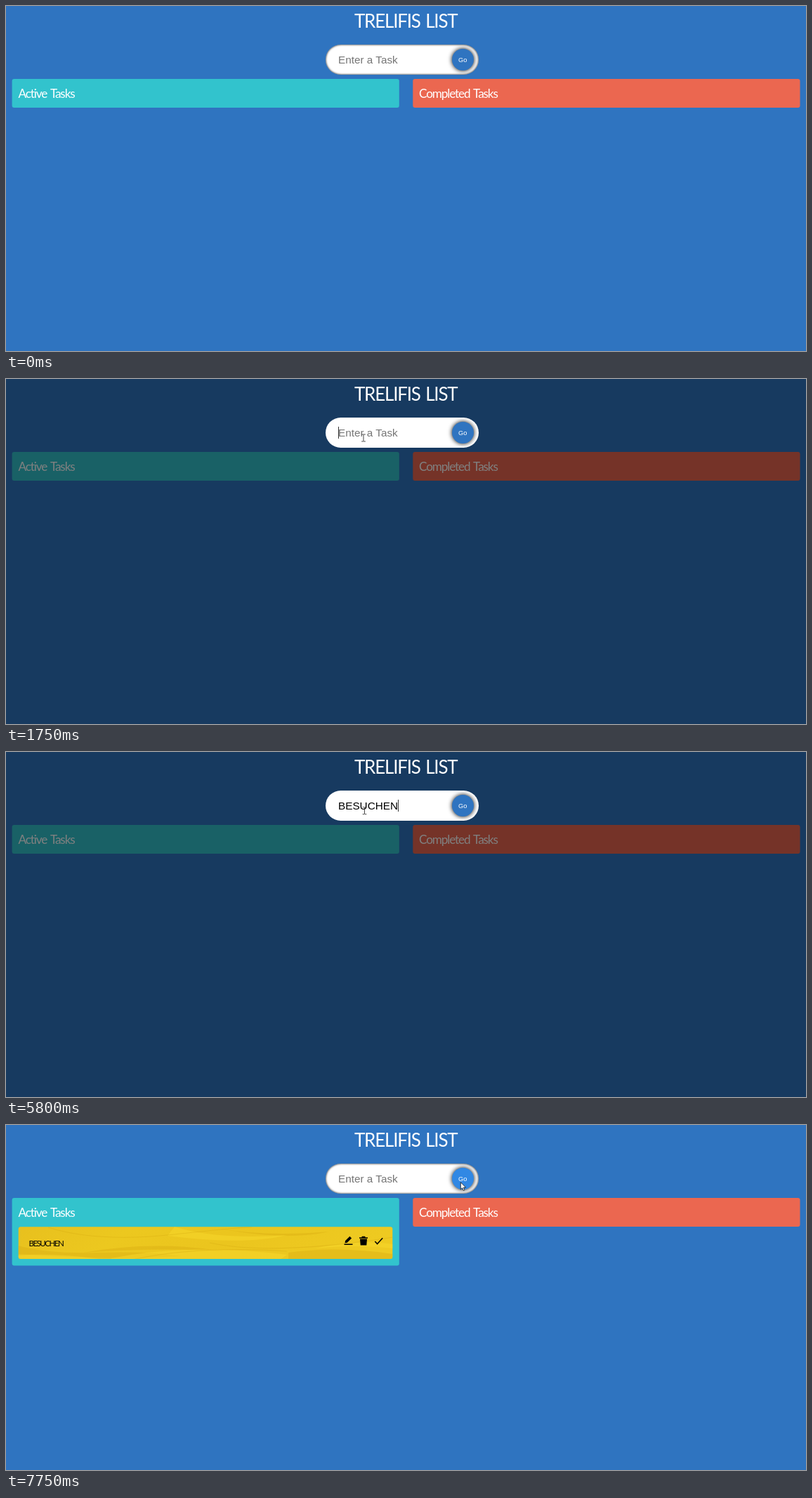
These frames come from a looping animation (1139 px wide and 492 px high, 8000 ms). An HTML page:

```html
<!DOCTYPE html>
<html lang="en">
<head>
<meta charset="utf-8">
<title>Task list</title>
<style>
  html, body { margin: 0; width: 100%; height: 100%; overflow: hidden; background: #2f74c0; }
  body { position: relative; }
  svg, #field, #go { position: absolute; }
  svg { left: 0; top: 0; width: 1139px; height: 492px; }
  text { white-space: pre; }
  .hand { font-family: Lato, "Open Sans", sans-serif; fill: #fff; }
  .head { font-size: 17.2px; letter-spacing: -1.15px; word-spacing: 2px; }
  .title { font-size: 26px; letter-spacing: -1.2px; word-spacing: 2px; text-anchor: middle; }
  .task { font-size: 11.5px; letter-spacing: -1.5px; fill: #000; }
  .plain { font-family: "Liberation Sans", Arial, sans-serif; font-size: 15.3px; }
  #field {
    left: 454.5px; top: 55.3px; width: 218.3px; height: 42.4px;
    border-radius: 22px; background: #fff; box-shadow: inset 0 0 3px #000;
  }
  #field.focus { box-shadow: 0 0 6px 1200px rgba(0, 0, 0, .5); }
  #go {
    left: 634.5px; top: 61px; width: 31px; height: 31px;
    border-radius: 50%; box-shadow: 0 0 6px #000;
  }
</style>
</head>
<body>
<svg viewBox="0 0 1139 492">
  <defs>
    <linearGradient id="cloth" x2="1" y2=".12">
      <stop offset="0" stop-color="#e8c01e"/>
      <stop offset=".3" stop-color="#ecc81f"/>
      <stop offset=".6" stop-color="#ebc51e"/>
      <stop offset="1" stop-color="#eeca21"/>
    </linearGradient>
    <clipPath id="cardShape"><rect x="17.7" y="145.3" width="532.6" height="45.8" rx="3"/></clipPath>
  </defs>
  <rect id="active" x="8.6" y="104" width="551.2" height="41" rx="3" fill="#32c3cd"/>
  <rect x="579.3" y="104" width="551.2" height="41" rx="3" fill="#eb6750"/>
  <text class="hand head" x="17.5" y="131">Active Tasks</text>
  <text class="hand head" x="588" y="131">Completed Tasks</text>
  <g id="card">
    <g clip-path="url(#cardShape)">
      <rect x="17" y="145" width="534" height="47" fill="url(#cloth)"/>
      <path fill="#d9ae13" opacity=".45" d="M17 172Q60 184 130 182T250 187Q150 194 17 184ZM110 182Q210 164 310 180Q220 174 110 182ZM300 147Q370 160 460 152Q400 166 300 147ZM402 182Q470 172 551 184V192H402Z"/>
      <path fill="#f8d92e" opacity=".45" d="M150 190Q260 168 400 185L390 192H150ZM17 186Q70 182 140 192H17ZM240 145Q300 164 400 157Q340 172 230 158ZM440 176Q500 162 551 170V176Q500 170 440 176Z"/>
      <path fill="none" stroke="#d2a60f" stroke-width="1.2" opacity=".35" d="M60 146Q130 168 240 156T350 146M290 168Q380 187 551 160M180 192Q270 172 400 180"/>
    </g>
    <text class="hand task" x="32.5" y="172.5">BESUCHEN</text>
    <path d="M481.5 169.5h12v1.5h-12ZM482.5 168.2l.6-3.2 6.3-6.3 2.7 2.7-6.4 6.3Z"/>
    <path d="M503 160.2h3.2l.7-1.4h4.2l.7 1.4h3.2v1.6h-12ZM504 162.4h10l-.7 9h-8.6Z"/>
    <path fill="none" stroke="#000" stroke-width="1.5" d="M525.3 166l3.3 3.6 7.6-8.4"/>
  </g>
</svg>
<div id="field"></div>
<div id="go"></div>
<svg viewBox="0 0 1139 492">
  <text class="hand title" x="569.2" y="30.5">TRELIFIS LIST</text>
  <text class="plain" id="entry" x="473" y="81.7"></text>
  <rect id="caret" y="68" width="1" height="17" fill="#333"/>
  <circle id="press" r="9.7" fill="#fff000" opacity=".62"/>
  <text class="plain" x="650.3" y="80.2" text-anchor="middle" fill="#fff" style="font-size:9.3px">Go</text>
  <path id="beam" fill="none" stroke="#333" stroke-width=".9" d="M-2.8-5h2.2L0-4.5.6-5h2.2M0-4.5v9M-2.8 5h2.2L0 4.5.6 5h2.2"/>
  <path id="arrow" fill="#fff" stroke="#111" stroke-width=".8" stroke-linejoin="round" d="M0 0V10.2L2.4 8 4 11.8 5.7 11 4.1 7.4H7.3Z"/>
</svg>
<script>
  const LOOP = 8000, FOCUS = 1750, BLUR = 7680, ADDED = 7750;
  const WORD = "BESUCHEN";
  const keys = [3190, 3460, 3610, 4270, 4670, 5210, 5340, 5800];
  // Pointer path: time, x, y
  const path = [
    [570, 1099, 468], [780, 850, 345], [990, 632, 215], [1130, 515, 153],
    [1200, 492, 138], [1340, 511, 102], [1410, 511, 98], [1610, 508.7, 84.3],
    [1750, 509, 84], [1810, 510.5, 83.7], [6760, 510.5, 83.7], [6990, 552, 81],
    [7260, 636, 79], [7400, 645, 81], [7550, 647.3, 81.7]
  ];
  // Spans of pointer motion: start, end, refresh interval
  const runs = [[570, 1340, 70], [1410, 1810, 200 / 3], [6790, 7550, 69]];
  const el = {};
  for (const id of ["active", "card", "field", "go", "entry", "caret", "press", "beam", "arrow"])
    el[id] = document.getElementById(id);

  const show = (node, on) => { node.style.visibility = on ? "visible" : "hidden"; };
  const within = (t, a, b) => t >= a && t < b;
  const mix = (a, b, p) => a + (b - a) * p;

  function refresh(t) {
    for (const [a, b, step] of runs)
      if (within(t, a, b)) return a + Math.floor((t - a) / step) * step;
    return t;
  }

  function pointer(t) {
    const i = path.findIndex(k => k[0] > t);
    if (i < 0) return path[path.length - 1].slice(1);
    if (i === 0) return path[0].slice(1);
    const [t0, x0, y0] = path[i - 1], [t1, x1, y1] = path[i];
    const p = (t - t0) / (t1 - t0);
    return [mix(x0, x1, p), mix(y0, y1, p)];
  }

  // The caret blinks from the last key press
  function caretOn(t, typed) {
    const since = typed ? keys[typed - 1] : 1670;
    return within(t, FOCUS, 7550) && Math.floor((t - since) / 530) % 2 === 0;
  }

  function draw(t) {
    const added = t >= ADDED;
    const typed = added ? 0 : keys.filter(k => k <= t).length;
    el.entry.textContent = typed ? WORD.slice(0, typed) : "Enter a Task";
    el.entry.setAttribute("fill", typed ? "#000" : "#757575");
    show(el.caret, caretOn(t, typed));
    el.caret.setAttribute("x", 473 + (typed ? el.entry.getComputedTextLength() : 0));

    el.field.classList.toggle("focus", within(t, FOCUS, BLUR));
    show(el.card, added);
    el.active.setAttribute("height", added ? 96.4 : 41);

    const tick = refresh(t);
    const [x, y] = pointer(tick);
    const inField = y < 97 && x <= 634;
    for (const node of [el.beam, el.arrow, el.press])
      node.setAttribute("transform", `translate(${x} ${y})`);
    show(el.beam, t >= 570 && inField);
    show(el.arrow, t >= 570 && !inField);
    show(el.press, within(t, 1677, FOCUS) || within(t, 7620, ADDED));

    const hover = Math.min(1, Math.max(0, (tick - 7255) / 200));
    el.go.style.background = `rgb(${mix(47, 49, hover)},${mix(116, 136, hover)},${mix(192, 228, hover)})`;
  }

  const start = performance.now();
  function loop() {
    draw((performance.now() - start) % LOOP);
    requestAnimationFrame(loop);
  }
  loop();
</script>
</body>
</html>
```
